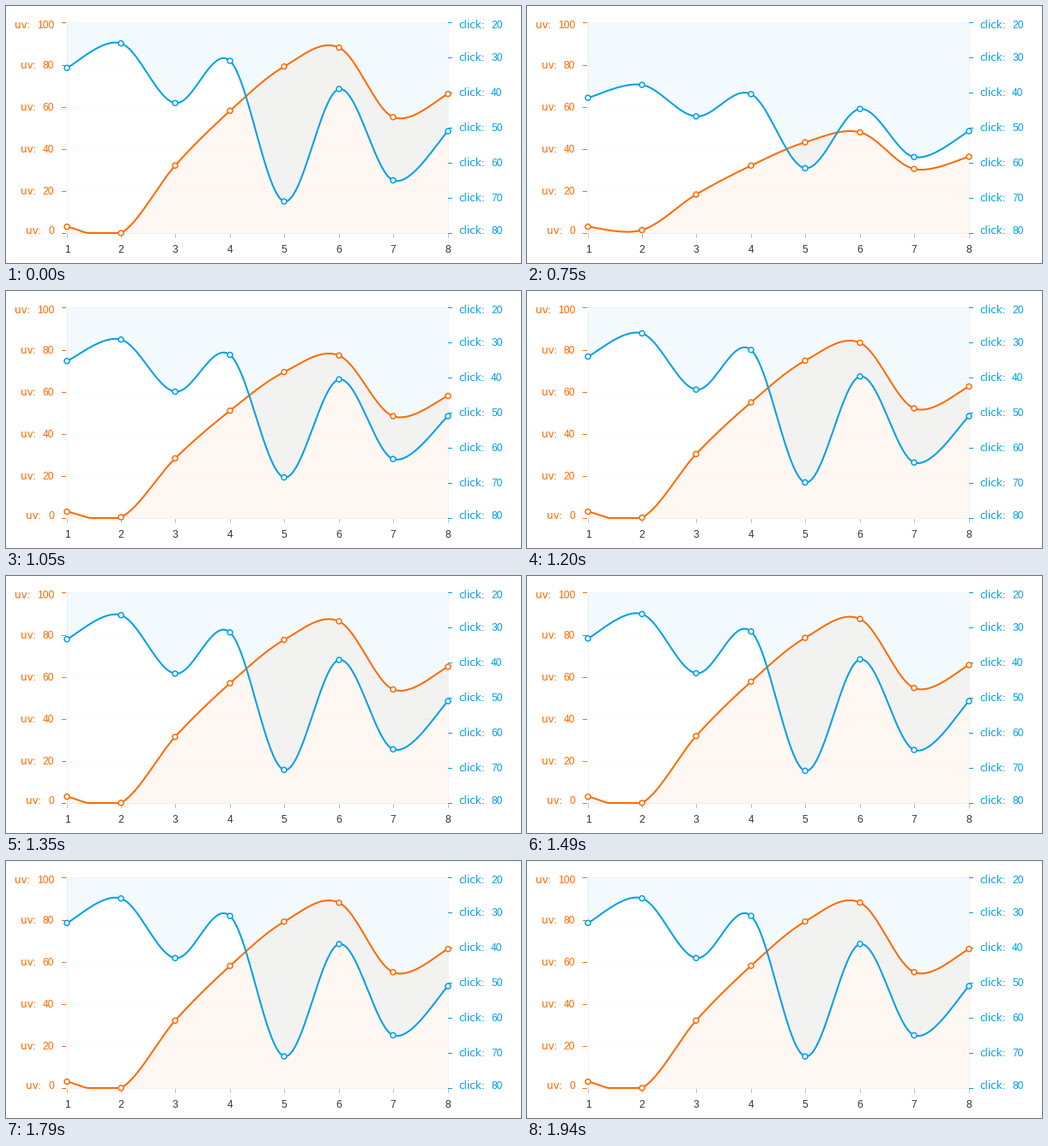
Write a matplotlib script that moves like this. It is 600 px wide and 300 px high and loops after 5560 ms.

```python
import numpy as np
import matplotlib.pyplot as plt
from matplotlib.animation import FuncAnimation
from matplotlib.patches import Circle, Polygon

W, H, DPI = 600, 300, 100
PX = 72 / DPI                       # one pixel in points
LOOP, STEP = 5560, 20               # ms
LEFT, RIGHT, TOP, BASE = 71, 515, 19, 265
ORANGE, BLUE = "#ff6a00", "#009fe8"

uv = np.array([3, 0, 32, 58, 79, 88, 55, 66])
clicks = np.array([33, 26, 43, 31, 71, 39, 65, 51])
xs = np.floor(np.linspace(LEFT, RIGHT, len(uv)))
uv_y = BASE - (BASE - TOP) * uv / 100
click_y = TOP + (BASE - TOP) * (clicks - 20) / 60

# The chart grows in visible steps: start time in ms and share of the way
TIMES = [0, 750, 900, 1050, 1200, 1350, 1490, 1640, 1790, 1940]
GROWTH = [1, 0.527, 0.762, 0.872, 0.943, 0.979, 0.992, 0.997, 0.999, 1]


def spline(v, n=24):
    """Catmull-Rom curve through v, end points doubled."""
    p = np.concatenate([v[:1], v, v[-1:]])
    p0, p1, p2, p3 = (p[k:len(p) - 3 + k, None] for k in range(4))
    t = np.linspace(0, 1, n, endpoint=False)
    m1, m2 = (p2 - p0) / 2, (p3 - p1) / 2
    c = (2 * (p1 - p2) + m1 + m2) * t**3 + (3 * (p2 - p1) - 2 * m1 - m2) * t**2
    return np.append((c + m1 * t + p1).ravel(), v[-1])


fig = plt.figure(figsize=(W / DPI, H / DPI), dpi=DPI, facecolor="white")
ax = fig.add_axes([0, 0, 1, 1])
ax.set_xlim(0, W)
ax.set_ylim(H, 0)
ax.axis("off")


def hline(x0, x1, y, color, **kw):
    """Fill the pixel row y from x0 up to x1."""
    ax.plot([x0, x1], [y + 0.5] * 2, color=color, lw=PX, snap=False,
            solid_capstyle="butt", **kw)


def vline(x, y0, y1, color, **kw):
    ax.plot([x + 0.5] * 2, [y0, y1], color=color, lw=PX, snap=False,
            solid_capstyle="butt", **kw)


def label(x, y, s, color, font="Liberation Sans", ha="left"):
    ax.text(x, y + 4, s, color=color, family=font, size=12 * PX, ha=ha,
            va="baseline")


# Frame, grid and axes
for x in (LEFT, RIGHT):
    vline(x, TOP, BASE, "black", alpha=0.05, zorder=2)
hline(LEFT, RIGHT, BASE, "black", alpha=0.06, zorder=2)

for k in range(6):
    y = int(np.ceil(BASE - (BASE - TOP) * k / 5))
    if k:
        hline(LEFT, RIGHT, y, "black", alpha=0.018, zorder=2)
    hline(65, 70, y, ORANGE)
    num = str(20 * k)
    text_y = min(max(y, 22), 262)
    label(56, text_y, num, ORANGE, ha="right")
    label(23.3 - 6.67 * (len(num) - 1), text_y, "uv:", ORANGE, "DejaVu Sans")

for k in range(7):
    y = TOP + 41 * k
    hline(515, 520, y, BLUE)
    text_y = min(max(y, 22), 262)
    label(527.4, text_y, "click:", BLUE, "DejaVu Sans")
    label(565, text_y, str(20 + 10 * k), BLUE)

for i, x in enumerate(xs):
    vline(x, 266, 271, "#c0c0c0")
    label(x, 284, str(i + 1), "#333333", ha="center")


class Series:
    def __init__(self, ys, start, edge, color, z):
        self.ys, self.start, self.edge = ys, start, edge
        self.cx = spline(xs)
        self.area = ax.add_patch(Polygon([(0, 0)], color=color, alpha=0.05,
                                         lw=0, zorder=1))
        self.line, = ax.plot([], [], color=color, lw=2 * PX, zorder=z,
                             solid_joinstyle="round")
        self.dots = [ax.add_patch(Circle((x, 0), 3, fc="white", ec=color,
                                         lw=1.5 * PX, zorder=z + 0.5))
                     for x in xs]

    def grow(self, k):
        ys = self.start + (self.ys - self.start) * k
        cy = np.clip(spline(ys), TOP, BASE)
        self.line.set_data(self.cx, cy)
        self.area.set_xy([(LEFT, self.edge), *zip(self.cx, cy),
                          (RIGHT, self.edge)])
        for dot, x, y in zip(self.dots, xs, ys):
            dot.center = x, y
        return [self.area, self.line, *self.dots]


series = [Series(uv_y, uv_y[0], BASE, ORANGE, 4),
          Series(click_y, click_y[-1], TOP, BLUE, 5)]


def update(i):
    t = i * STEP + STEP / 2
    k = GROWTH[np.searchsorted(TIMES, t, side="right") - 1]
    return [a for s in series for a in s.grow(k)]


anim = FuncAnimation(fig, update, frames=LOOP // STEP, interval=STEP,
                     repeat=True, repeat_delay=0)
plt.show()
```
